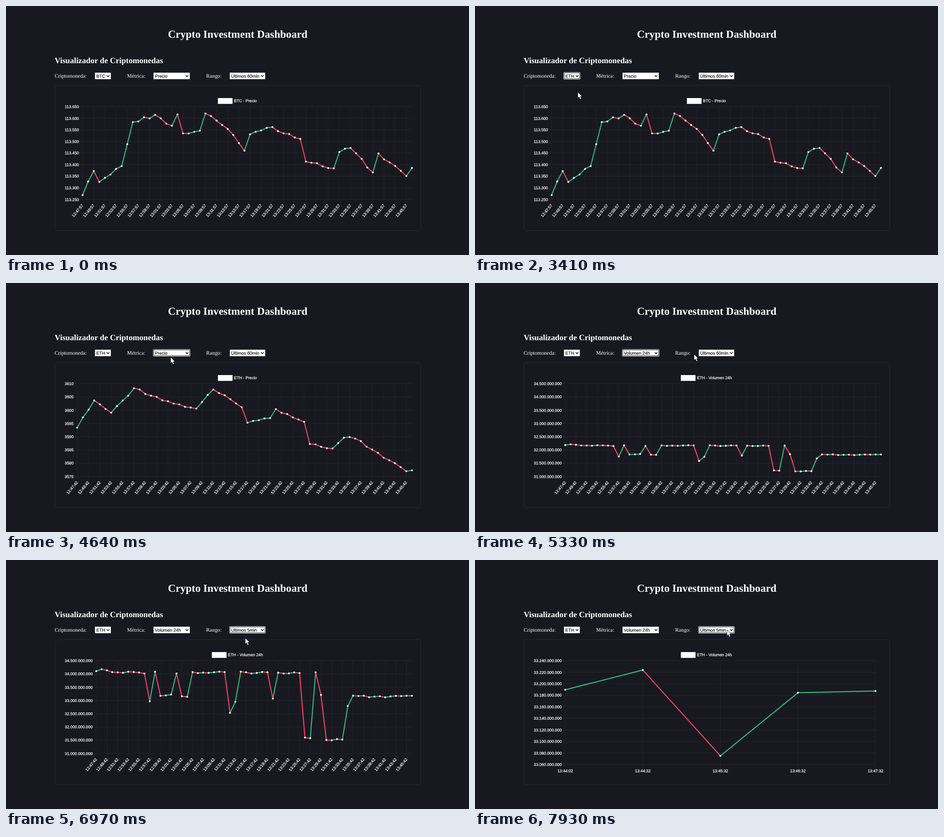
An HTML page for the animation above (8 s loop, 1020x549 px).

```html
<!DOCTYPE html>
<html lang="es">
<head>
<meta charset="utf-8">
<title>Crypto Investment Dashboard</title>
<style>
  html, body { margin: 0; width: 100%; height: 100%; overflow: hidden; background: #181920; }
  svg { display: block; width: 100vw; height: 100vh; }
  text { text-rendering: geometricPrecision; }
  .serif { font-family: "Liberation Serif", "Times New Roman", serif; fill: #fff; }
  .sans, .option { font-family: "Liberation Sans", Arial, sans-serif; }
  .sans text { font-size: 8.82px; fill: #fff; stroke: #fff; stroke-width: 0.25px; }
  .option { font-size: 9.8px; fill: #000; stroke: #000; stroke-width: 0.12px; }
  .label { font-size: 11.78px; }
  .line { fill: none; stroke-width: 2.2; }
</style>
</head>
<body>
<svg id="stage" viewBox="0 0 1020 549">
  <rect width="1020" height="549" fill="#181920"/>
  <g class="serif">
    <text x="510.5" y="69.6" font-size="23.55" font-weight="bold" text-anchor="middle">Crypto Investment Dashboard</text>
    <text x="107.2" y="125.6" font-size="17.68" font-weight="bold">Visualizador de Criptomonedas</text>
    <text class="label" x="107.2" y="158">Criptomoneda:</text>
    <text class="label" x="266.8" y="158">Métrica:</text>
    <text class="label" x="441" y="158">Rango:</text>
  </g>
  <rect x="107.5" y="175.5" width="806" height="320" rx="6" fill="none" stroke="#262931"/>
</svg>
<script>
const LOOP = 8000, TOP = 222, GROW = 1000, COUNT = 60;
const stage = document.getElementById("stage");

function add(parent, tag, attrs = {}, text = "") {
  const node = document.createElementNS("http://www.w3.org/2000/svg", tag);
  for (const key in attrs) node.setAttribute(key, attrs[key]);
  node.textContent = text;
  parent.appendChild(node);
  return node;
}

// Repeatable jitter between -1 and 1.
function jitter(i) {
  const n = Math.sin((i + 1) * 12.9898) * 43758.5453;
  return (n - Math.floor(n)) * 2 - 1;
}

const series = rule => Array.from({ length: COUNT }, (_, i) => rule(i));

// Straight runs between turning points [index, y], roughened in between.
const trend = (turns, rough) => series(i => {
  const next = Math.max(1, turns.findIndex(turn => turn[0] >= i));
  const [i0, y0] = turns[next - 1], [i1, y1] = turns[next];
  const noise = i === i0 || i === i1 ? 0 : jitter(i) * rough;
  return y0 + (y1 - y0) * (i - i0) / (i1 - i0) + noise;
});

// A plateau interrupted by dips [first, last, y].
const plateau = (level, dips, rough) => series(i => {
  const dip = dips.find(([first, last]) => i >= first && i <= last);
  return (dip ? dip[2] : level) + jitter(i) * rough;
});

const btcPrice = trend([[0, 417], [2, 364], [3, 388], [7, 353], [9, 256], [13, 240], [16, 264], [17, 239], [18, 281],
  [21, 275], [22, 237], [26, 271], [29, 319], [30, 283], [34, 267], [39, 293], [40, 343], [45, 358], [46, 322],
  [48, 313], [52, 367], [53, 325], [58, 375], [59, 357]], 4);
const ethPrice = trend([[0, 319], [3, 259], [6, 286], [10, 232], [17, 266], [21, 277], [24, 235], [29, 274], [30, 308],
  [34, 298], [35, 278], [40, 306], [41, 355], [45, 365], [47, 341], [49, 343], [58, 415], [59, 413]], 3);
const ethVolume = plateau(248, [[0, 2, 243], [10, 10, 310], [12, 14, 297], [16, 17, 301], [25, 25, 337], [26, 26, 315],
  [33, 33, 307], [39, 40, 391], [42, 42, 299], [43, 46, 396], [47, 47, 324], [48, 59, 301]], 2.5);
const ethRecent = [286, 242.5, 431.8, 292.5, 288.8];

const pad = n => String(n).padStart(2, "0");
const clock = s => [s / 3600, s / 60 % 60, s % 60].map(n => pad(Math.floor(n))).join(":");

// One label every two minutes, starting at 12:47.
const hourOf = second => Array.from({ length: COUNT / 2 }, (_, i) => clock((12 * 60 + 47 + 2 * i) * 60 + second));

const billions = n => n.toFixed(3) + ".000.000";
const charts = [
  { start: -GROW, title: "BTC - Precio", titleX: 502.3, left: 168.7, right: 894.3, base: 426.5, ys: btcPrice,
    times: hourOf(57), max: 113.65, step: 0.05, rows: 8, format: n => n.toFixed(3) },
  { start: 3510, title: "ETH - Precio", titleX: 502.3, left: 156.9, right: 894.3, base: 426.5, ys: ethPrice,
    times: hourOf(42), max: 3610, step: 5, rows: 7, format: String },
  { start: 5218, title: "ETH - Volumen 24h", titleX: 489, left: 198.8, right: 894.3, base: 426.5, ys: ethVolume,
    times: hourOf(42), max: 34.5, step: 0.5, rows: 7, format: billions },
  { start: 7070, title: "ETH - Volumen 24h", titleX: 489, left: 198.8, right: 882.3, base: 451, ys: ethRecent,
    times: ["13:44:02", "13:44:32", "13:45:32", "13:46:32", "13:47:32"],
    max: 33.24, step: 0.02, rows: 9, format: billions }
];

const pointX = (chart, i) => chart.left + (chart.right - chart.left) * i / (chart.ys.length - 1);

function buildChart(chart) {
  const { left, right, base, rows, times, titleX } = chart;
  const every = chart.ys.length / times.length;
  const group = add(stage, "g", { class: "sans" });
  let grid = "";
  for (let r = 0; r <= rows; r++) {
    const y = TOP + (base - TOP) * r / rows;
    grid += `M${left - 6} ${y}H${right}`;
    add(group, "text", { x: left - 8, y, dy: ".35em", "text-anchor": "end" }, chart.format(chart.max - r * chart.step));
  }
  times.forEach((time, i) => {
    const x = pointX(chart, i * every);
    grid += `M${x} ${TOP}V${base + 6}`;
    const place = every > 1
      ? { transform: `translate(${x} ${base + 11.5}) rotate(-50)`, "text-anchor": "end" }
      : { transform: `translate(${x} ${base + 13.7})`, "text-anchor": "middle" };
    add(group, "text", { ...place, dy: ".35em" }, time);
  });
  add(group, "path", { d: grid, stroke: "#24262e", fill: "none", "stroke-width": 0.9 });
  add(group, "rect", { x: titleX - 35.5, y: 203, width: 32.3, height: 12.8, fill: "#fff" });
  add(group, "text", { x: titleX, y: 211.8 }, chart.title);
  chart.up = add(group, "path", { class: "line", stroke: "#2ebd85" });
  chart.down = add(group, "path", { class: "line", stroke: "#f6465d" });
  chart.dots = add(group, "path", { fill: "none", stroke: "#fff", "stroke-width": 4.2, "stroke-linecap": "round" });
  chart.group = group;
}

function drawLine(chart, time) {
  const p = Math.min(1, Math.max(0, (time - chart.start) / GROW));
  const grown = 1 - (1 - p) ** 4;
  const spots = chart.ys.map((y, i) =>
    `${pointX(chart, i).toFixed(2)} ${(chart.base - (chart.base - y) * grown).toFixed(2)}`);
  let up = "", down = "";
  for (let i = 1; i < spots.length; i++) {
    const piece = `M${spots[i - 1]}L${spots[i]}`;
    if (chart.ys[i] < chart.ys[i - 1]) up += piece; else down += piece;
  }
  chart.up.setAttribute("d", up);
  chart.down.setAttribute("d", down);
  chart.dots.setAttribute("d", spots.map(s => `M${s}h.01`).join(""));
}

// Each select switches its text at `change` and shows a ring from `focus` to `blur`.
const selects = [
  { x: 196, width: 35, before: "BTC", after: "ETH", change: 3410, focus: 2390, blur: 4480 },
  { x: 325, width: 80, before: "Precio", after: "Volumen 24h", change: 5120, focus: 4480, blur: 6050 },
  { x: 493, width: 78, before: "Últimos 60min", after: "Últimos 5min", change: 6970, focus: 6050, blur: LOOP }
];

function buildSelect(select) {
  const { x, width } = select;
  const tip = x + width - 6.2;
  add(stage, "rect", { x, y: 147, width, height: 14.3, fill: "#fff", stroke: "#767676", "stroke-width": 0.4 });
  select.text = add(stage, "text", { class: "option", x: x + 3, y: 157.9 });
  add(stage, "path", { d: `M${tip - 2.8} 152.8l2.8 2.9l2.8 -2.9`, fill: "none", stroke: "#000", "stroke-width": 1.4 });
  select.ring = add(stage, "g", { fill: "none" });
  add(select.ring, "rect", { x: x + 0.5, y: 147.5, width: width - 1, height: 13, stroke: "#101014" });
  add(select.ring, "rect", { x: x - 0.5, y: 146.5, width: width + 1, height: 15, rx: 1.5, stroke: "#fff" });
}

// Pointer glides, each starting where the last one ended.
const entry = { x: 0, y: 403 };
const glides = [
  { from: 390, to: 1170, x: 206, y: 153 },
  { from: 2850, to: 3400, x: 226, y: 190 },
  { from: 3410, to: 3980, x: 360, y: 155 },
  { from: 4600, to: 4820, x: 368, y: 181 },
  { from: 5120, to: 5600, x: 535, y: 146 },
  { from: 6200, to: 6570, x: 527, y: 172 },
  { from: 6970, to: 7750, x: 555, y: 154 }
];

function pointerAt(time) {
  let { x, y } = entry;
  for (const glide of glides) {
    const p = Math.min(1, Math.max(0, (time - glide.from) / (glide.to - glide.from)));
    const eased = 1 - (1 - p) ** 2;
    x += (glide.x - x) * eased;
    y += (glide.y - y) * eased;
  }
  return [x, y];
}

charts.forEach(buildChart);
selects.forEach(buildSelect);
const pointer = add(stage, "path", {
  d: "M0 0V13.4L3.1 10.6L5.3 15.8L7.8 14.7L5.6 9.7H9.6Z", fill: "#fff", stroke: "#08080b", "stroke-width": 0.8
});

const show = (node, on) => node.setAttribute("visibility", on ? "visible" : "hidden");

function render(time) {
  const active = charts.filter(c => time >= c.start).pop();
  charts.forEach(c => show(c.group, c === active));
  drawLine(active, time);
  for (const s of selects) {
    s.text.textContent = time < s.change ? s.before : s.after;
    show(s.ring, time >= s.focus && time < s.blur);
  }
  show(pointer, time >= glides[0].from);
  pointer.setAttribute("transform", `translate(${pointerAt(time)})`);
}

function frame() {
  render(performance.now() % LOOP);
  requestAnimationFrame(frame);
}
frame();
</script>
</body>
</html>
```
